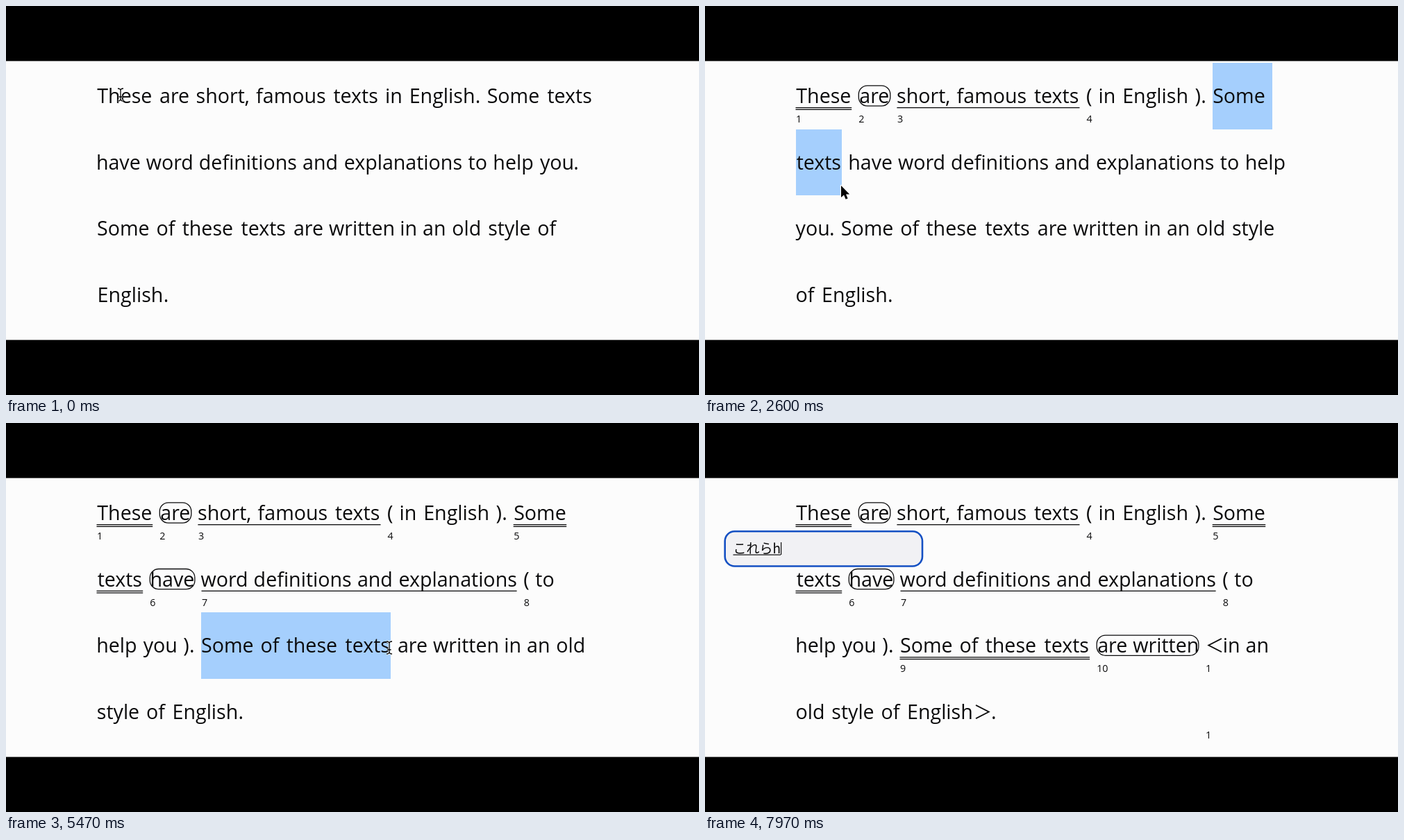
Recreate the animation shown at these times as an HTML page with a canvas. Size 998 px wide and 561 px high, loop 8000 ms.

```html
<!DOCTYPE html>
<html lang="en">
<head>
<meta charset="utf-8">
<title>Marking up a text</title>
<style>
  html, body { margin: 0; width: 100%; height: 100%; overflow: hidden; background: #000; }
  canvas { display: block; }
</style>
</head>
<body>
<canvas id="stage" width="998" height="561"></canvas>
<script>
const ctx = document.getElementById('stage').getContext('2d');
const LOOP = 8000;
const LEFT = 130.5, RIGHT = 850, TOP = 82, PITCH = 95.6, BASE = 140, SPACE = 9.6;
const INK = '#0b0b0c';
const TEXT_FONT = '28.6px "Open Sans", "Noto Sans", sans-serif';
const LABEL_FONT = '14.3px "Open Sans", "Noto Sans", sans-serif';
const ANGLE_FONT = '27px "Noto Sans CJK JP", "Noto Sans CJK", sans-serif';
const NOTE_FONT = '19px "Noto Sans CJK JP", "Noto Sans CJK", sans-serif';

const words = ('These are short, famous texts in English . Some texts have word definitions and ' +
  'explanations to help you . Some of these texts are written in an old style of English .').split(' ');

// Advance of each word on the line; glyphs keep their natural width.
const advance = {
  These: 80.7, are: 43.5, 'short,': 76.6, famous: 100.6, texts: 66.7, in: 23.4, English: 97, '.': 6,
  Some: 76.5, have: 62.6, word: 66.1, definitions: 139.9, and: 49.4, explanations: 169.9, to: 25.7,
  help: 57.6, you: 49.2, of: 26.8, these: 74.8, written: 91.5, an: 31.9, old: 41.9, style: 61.9
};
const padding = { box: 1.25, paren: 18, angle: 26 };

// kind, label, first word, last word, selection start, drag end, mark time, selection cleared
const marks = [
  ['double', '1', 0, 0, 170, 170, 380, 450],
  ['box', '2', 1, 1, 620, 620, 770, 860],
  ['single', '3', 2, 4, 1000, 1350, 1450, 1530],
  ['paren', '4', 5, 6, 1600, 1900, 2030, 2130],
  ['double', '5', 8, 9, 2250, 2610, 2720, 2830],
  ['box', '6', 10, 10, 2950, 2950, 3100, 3200],
  ['single', '7', 11, 14, 3250, 3600, 3690, 3860],
  ['paren', '8', 15, 17, 4000, 4580, 4750, 4880],
  ['double', '9', 19, 22, 5050, 5400, 5500, 5600],
  ['box', '10', 23, 24, 5680, 5950, 6050, 6150],
  ['angle', '1', 25, 30, 6230, 6560, 6720, 6830]
].map(([kind, label, first, last, start, dragEnd, at, clear]) =>
  ({ kind, label, first, last, start, dragEnd, at, clear }));

// The last drag strays off the text and briefly selects backwards.
const stray = { from: 6290, to: 6440, first: 19, last: 24 };

// time, x, y
const pointerPath = [
  [0, 165, 128], [400, 165, 128], [580, 243, 130], [820, 243, 130], [1000, 277, 131],
  [1350, 538, 134], [1480, 538, 134], [1600, 550, 134], [1880, 675, 137], [2050, 675, 137],
  [2250, 733, 132], [2590, 196, 259], [2750, 196, 259], [2920, 240, 228], [3120, 240, 228],
  [3250, 282, 226], [3600, 737, 223], [3820, 737, 223], [4000, 746, 226], [4540, 174, 329],
  [4800, 174, 329], [5050, 281, 323], [5400, 552, 324], [5560, 552, 324], [5680, 565, 322],
  [5950, 710, 322], [6090, 710, 322], [6220, 722, 322], [6370, 460, 404], [6550, 387, 418],
  [6740, 387, 418], [7000, 134, 163]
];

const note = { open: 7080, typing: 7250, steps: [
  [7250, 'k'], [7340, 'こ'], [7450, 'こr'], [7540, 'これ'], [7650, 'これr'], [7750, 'これら'], [7880, 'これらh']
] };

function pointerAt(t) {
  const next = pointerPath.findIndex(p => p[0] > t);
  if (next < 0) return { x: pointerPath.at(-1)[1], y: pointerPath.at(-1)[2] };
  const [t0, x0, y0] = pointerPath[next - 1], [t1, x1, y1] = pointerPath[next];
  const u = (t - t0) / (t1 - t0), e = u * u * (3 - 2 * u);
  return { x: x0 + (x1 - x0) * e, y: y0 + (y1 - y0) * e };
}

function layout(active) {
  let x = LEFT, line = 0;
  return words.map((text, i) => {
    const opens = active.find(m => m.first === i);
    const closes = active.find(m => m.last === i);
    const pre = opens && padding[opens.kind] || 0;
    const post = closes && padding[closes.kind] || 0;
    const width = advance[text];
    if (i && text !== '.') {
      x += SPACE;
      if (x + pre + width > RIGHT) { x = LEFT; line++; }
    }
    const item = { text, line, width, left: x, x: x + pre, right: x + pre + width + post };
    x = item.right;
    return item;
  });
}

const lineEnd = (items, line) => Math.max(LEFT, ...items.filter(w => w.line === line).map(w => w.right));

// Nearest gap between two letters on the pointer's line.
function caretAt(items, p) {
  const line = Math.max(0, Math.min(3, Math.floor((p.y - TOP) / PITCH)));
  ctx.font = TEXT_FONT;
  let best = LEFT;
  for (const w of items.filter(w => w.line === line)) {
    const scale = w.width / ctx.measureText(w.text).width;
    for (let n = 0; n <= w.text.length; n++) {
      const edge = w.x + ctx.measureText(w.text.slice(0, n)).width * scale;
      if (Math.abs(edge - p.x) < Math.abs(best - p.x)) best = edge;
    }
  }
  return { line, x: best };
}

function selectionAt(t, items, pointer) {
  const m = marks.find(m => t >= m.start && t < m.clear);
  if (!m) return null;
  const startOf = i => ({ line: items[i].line, x: items[i].x });
  const endOf = i => ({ line: items[i].line, x: items[i].x + items[i].width });
  if (t >= stray.from && t < stray.to) {
    const end = endOf(stray.last);
    return [startOf(stray.first), { line: end.line, x: end.x + SPACE + padding.box }];
  }
  const end = t < m.dragEnd ? caretAt(items, pointer) : endOf(m.last);
  return [startOf(m.first), end].sort((a, b) => a.line - b.line || a.x - b.x);
}

function drawSelection([a, b], items, active) {
  for (let line = a.line; line <= b.line; line++) {
    const x0 = Math.round(line === a.line ? a.x : LEFT);
    const x1 = Math.round(line === b.line ? b.x : lineEnd(items, line) + SPACE);
    const y = Math.round(TOP + line * PITCH);
    const height = Math.round(TOP + (line + 1) * PITCH) - y;
    ctx.fillStyle = 'rgba(129,188,254,.7)';
    ctx.fillRect(x0, y, x1 - x0, height);
    ctx.fillStyle = '#f8faff';
    for (const m of active.filter(m => m.kind === 'box' && items[m.first].line === line)) {
      for (const x of [items[m.first].left, items[m.last].right]) {
        if (x > x0 && x < x1) ctx.fillRect(x - .6, y, 1.3, height);
      }
    }
  }
}

function drawMark(m, items) {
  const group = items.slice(m.first, m.last + 1);
  const first = group[0], last = group.at(-1);
  ctx.strokeStyle = ctx.fillStyle = INK;
  ctx.lineWidth = 1.3;
  if (m.kind === 'box') {
    ctx.beginPath();
    ctx.roundRect(first.left + .5, 114.9 + first.line * PITCH, last.right - first.left - .5, 29.2, 12.5);
    ctx.stroke();
  } else if (m.kind === 'single' || m.kind === 'double') {
    for (const line of new Set(group.map(w => w.line))) {
      const run = group.filter(w => w.line === line);
      const y = 146 + line * PITCH, width = run.at(-1).right - run[0].left;
      ctx.fillRect(run[0].left, y, width, 1.3);
      if (m.kind === 'double') ctx.fillRect(run[0].left, y + 2.7, width, 1.3);
    }
  }
}

// Each word sits in the middle of its advance.
function drawWord({ text, x, width, line }) {
  ctx.font = TEXT_FONT;
  ctx.fillText(text, x + (width - ctx.measureText(text).width) / 2, BASE + line * PITCH);
}

function drawBrackets(m, items) {
  const first = items[m.first], last = items[m.last];
  const angle = m.kind === 'angle';
  if (!angle && m.kind !== 'paren') return;
  ctx.font = angle ? ANGLE_FONT : TEXT_FONT;
  ctx.fillText(angle ? '＜' : '(', first.left, BASE + first.line * PITCH);
  ctx.fillText(angle ? '＞' : ')', last.x + last.width + (angle ? -.5 : SPACE - 1.2), BASE + last.line * PITCH);
}

function drawLabel(m, items) {
  const { left, line } = items[m.first];
  ctx.font = LABEL_FONT;
  const rows = m.kind === 'angle' ? [0, 1] : [0];
  for (const row of rows) ctx.fillText(m.label, left + .5, 168 + (line + row) * PITCH);
}

const beam = new Path2D('M-4-9Q0-9 0-6Q0-9 4-9M0-6V6M-4 9Q0 9 0 6Q0 9 4 9M-2.5 3H2.5');
const arrow = new Path2D('M0 0V17L4 13.5L6.7 19.8L9.6 18.5L7 12.4H12.2Z');

function drawPointer(p, items) {
  const line = Math.round((p.y - 130) / PITCH);
  const overText = Math.abs(p.y - 130 - line * PITCH) < 20 && p.x > LEFT - 3 && p.x < lineEnd(items, line) + 4;
  ctx.save();
  ctx.translate(p.x, p.y);
  ctx.lineJoin = 'round';
  ctx.strokeStyle = '#fff';
  ctx.lineWidth = overText ? 3 : 2.4;
  ctx.stroke(overText ? beam : arrow);
  ctx.strokeStyle = ctx.fillStyle = '#000';
  ctx.lineWidth = 1.3;
  if (overText) ctx.stroke(beam); else ctx.fill(arrow);
  ctx.restore();
}

function drawNote(t) {
  ctx.beginPath();
  ctx.roundRect(28.7, 156.2, 284.3, 50.3, 14);
  ctx.fillStyle = '#f1f1f4';
  ctx.fill();
  ctx.strokeStyle = '#1450c3';
  ctx.lineWidth = 2.6;
  ctx.stroke();
  const typed = note.steps.filter(s => s[0] <= t).at(-1)?.[1] || '';
  ctx.font = NOTE_FONT;
  ctx.fillStyle = INK;
  ctx.fillText(typed, 40.5, 188);
  const width = ctx.measureText(typed).width;
  ctx.fillRect(40.5, 189.5, width, 1.2);
  ctx.fillRect(40.5 + width, 172, 1.2, 18);
}

function draw(t) {
  const active = marks.filter(m => t >= m.at);
  const items = layout(active);
  const pointer = pointerAt(t);
  const selection = selectionAt(t, items, pointer);
  ctx.fillStyle = '#000';
  ctx.fillRect(0, 0, 998, 561);
  ctx.fillStyle = '#fcfcfc';
  ctx.fillRect(0, 79.4, 998, 402.2);
  active.forEach(m => drawMark(m, items));
  if (selection) drawSelection(selection, items, active);
  ctx.fillStyle = INK;
  items.forEach(drawWord);
  for (const m of active) {
    drawBrackets(m, items);
    drawLabel(m, items);
  }
  if (t >= note.open) drawNote(t);
  if (t < note.typing) drawPointer(pointer, items);
}

const began = performance.now();
function tick() {
  draw((performance.now() - began) % LOOP);
  requestAnimationFrame(tick);
}
tick();
</script>
</body>
</html>
```
